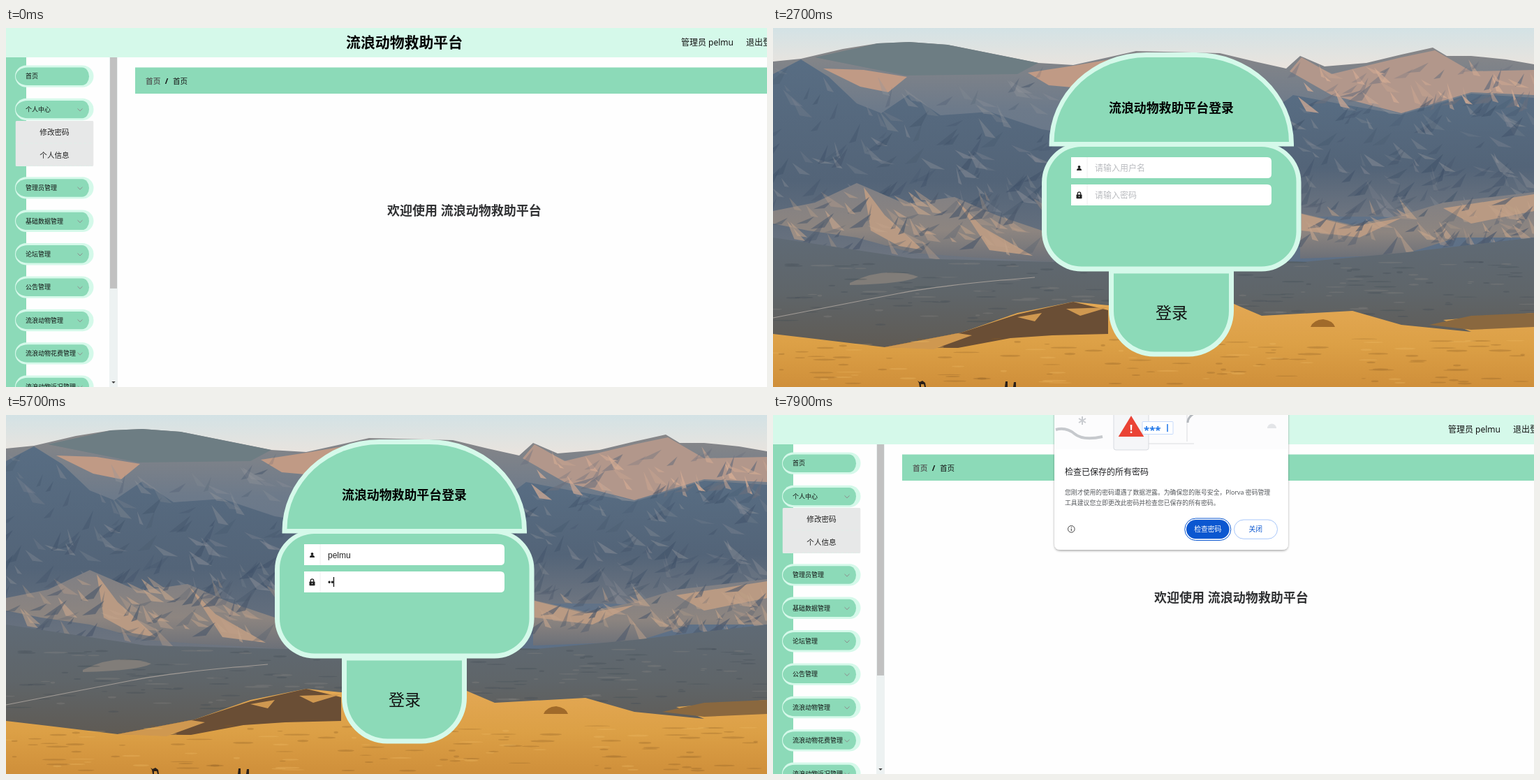
Write an HTML page that moves like this. It is 1090x514 px and loops after 8000 ms.

```html
<!DOCTYPE html>
<html lang="zh">
<head>
<meta charset="utf-8">
<style>
html, body { margin: 0; width: 100%; height: 100%; overflow: hidden; background: #fff }
svg { display: block }
#stage { position: absolute; left: 0; top: 0; font-family: "Noto Sans", "Noto Sans CJK SC", sans-serif }
.b { font-weight: 700 }
.m { text-anchor: middle }
.r { text-anchor: end }
.latin { font-family: "Liberation Sans", "Noto Sans CJK SC", sans-serif }
</style>
</head>
<body>
<svg id="stage" width="1090" height="514" viewBox="0 0 1090 514">
  <defs>
    <linearGradient id="sky" x2="0" y2="1"><stop stop-color="#d3e2e5"/><stop offset="1" stop-color="#efe4dc"/></linearGradient>
    <linearGradient id="far" x2="0" y2="1"><stop stop-color="#8a8888"/><stop offset=".3" stop-color="#6d7a8a"/><stop offset="1" stop-color="#5c6f86"/></linearGradient>
    <linearGradient id="near" x2="0" y2="1"><stop stop-color="#586d83"/><stop offset=".6" stop-color="#536478"/><stop offset="1" stop-color="#6e7580"/></linearGradient>
    <linearGradient id="foot" x2="0" y2="1"><stop stop-color="#7f7f84"/><stop offset=".6" stop-color="#8d8580"/><stop offset="1" stop-color="#6c7078"/></linearGradient>
    <linearGradient id="plain" x2="0" y2="1"><stop stop-color="#5f6a75"/><stop offset=".5" stop-color="#5f6569"/><stop offset="1" stop-color="#5f5a53"/></linearGradient>
    <linearGradient id="sand" x2="0" y2="1"><stop stop-color="#e3a854"/><stop offset=".5" stop-color="#dca046"/><stop offset="1" stop-color="#cf8f3a"/></linearGradient>
    <filter id="shade" x="-10%" y="-10%" width="120%" height="125%"><feDropShadow dx="0" dy="1.5" stdDeviation="1.6" flood-opacity=".35"/></filter>
  </defs>
  <g id="photo"></g>
  <g id="view"></g>
</svg>
<script>
const GREEN = '#8cdab8', MINT = '#d5f9ea', TEAL = '#00c292', LEAF = '#6ec455', GREY = '#606266', PALE = '#c0c4cc', LINE = '#dcdfe6';
const USER = 'pelmu', SITE = '流浪动物救助平台';
const MENU = ['首页', '个人中心', '管理员管理', '基础数据管理', '论坛管理', '公告管理', '流浪动物管理', '流浪动物花费管理', '流浪动物近况管理', '流浪动物领养管理'];

const clamp = u => Math.min(1, Math.max(0, u));
const smooth = u => (u = clamp(u), u * u * (3 - 2 * u));
const text = (x, y, size, str, fill = '#222', cls = '') =>
  `<text x="${x}" y="${y + size * .38}" font-size="${size}" style="fill:${fill}" class="${cls}">${str}</text>`;
const box = (x, y, w, h, fill, rx = 0, stroke = 'none') =>
  `<rect x="${x}" y="${y}" width="${w}" height="${h}" fill="${fill}" rx="${rx}" stroke="${stroke}"/>`;
const path = (d, fill, stroke = 'none', w = 1) =>
  `<path d="${d}" fill="${fill}" stroke="${stroke}" stroke-width="${w}"/>`;
const dot = (x, y, r, fill, stroke = 'none') =>
  `<circle cx="${x}" cy="${y}" r="${r}" fill="${fill}" stroke="${stroke}"/>`;
const at = (x, y, body) => `<g transform="translate(${x} ${y})">${body}</g>`;
const field = (x, y, w, h) => box(x, y, w, h, '#fff', 3, LINE);
const lens = (x, y, c) => at(x, y, dot(-.6, -.6, 4, 'none', c) + path('M2.3 2.3l2.8 2.8', 'none', c));

function photo() {
  let seed = 7;
  const rnd = () => (seed = seed * 16807 % 2147483647) / 2147483647;
  // Alternate lit and shaded rock faces
  const facets = (n, left, top, width, height, lit, dark, alpha = .3) => {
    let s = '';
    for (let i = 0; i < n; i++) {
      const x = left + rnd() * width, y = top + rnd() * height, w = 8 + rnd() * 28, h = 8 + rnd() * 22, side = i % 2 ? -1 : 1;
      s += `<path d="M${x} ${y}l${side * w} ${h}l${-side * w * .6} ${-h * .1}z" fill="${i % 2 ? dark : lit}" opacity="${alpha * (.5 + rnd())}"/>`;
    }
    return s;
  };
  const streaks = (n, top, height, fill) => {
    let s = '';
    for (let i = 0; i < n; i++)
      s += `<ellipse cx="${rnd() * 1090}" cy="${top + rnd() * height}" rx="${3 + rnd() * 16}" ry="${.6 + rnd()}" fill="${fill}" opacity=".3"/>`;
    return s;
  };
  return box(0, 0, 1090, 70, 'url(#sky)') +
    path('M0 48L40 44 100 30 150 22 195 20 250 24 300 34 380 50 430 53 480 42 520 33 640 36 690 48 735 58 755 40 790 55 850 50 900 38 945 28 965 40 1000 40 1050 45 1090 52V340H0z', 'url(#far)') +
    path('M60 42L150 22 195 20 250 24 380 50 350 66 190 68z', '#6d7d83') +
    path('M72 58L130 60 192 70 165 92 125 84zM365 64L430 54 500 42 440 86 395 82z', '#c09a85') +
    path('M740 62L757 42 800 66 900 42 948 32 1000 62 1090 60V96L1000 92 900 122 800 96z', '#b2978b') +
    path('M0 66L40 45 80 70 120 108 155 122 195 95 240 125 310 120 385 145 480 160V335H0z', 'url(#near)') +
    path('M700 130L745 96 820 110 900 124 1000 94 1090 100V270H700z', 'url(#near)') +
    facets(130, 0, 55, 420, 190, '#93959b', '#3a4c64') +
    facets(130, 700, 95, 390, 155, '#93959b', '#3a4c64') +
    facets(60, 750, 45, 340, 55, '#d8ae94', '#6a6f7c', .5) +
    path('M0 262L60 250 120 222 190 252 260 242 320 268 400 295V335L280 328 200 322 120 300 50 290 0 280z', 'url(#foot)') +
    path('M755 265L830 282 900 268 960 250 1090 235V300L980 300 900 325 755 330z', 'url(#foot)') +
    path('M130 228L160 268 215 318 180 312 140 290zM262 245L300 285 372 326 310 318zM757 266L830 284 900 272 840 300 757 290zM960 258L1090 238V262L1000 280z', '#b99a83') +
    facets(80, 20, 228, 380, 80, '#c4a48b', '#4b586b', .45) +
    facets(80, 755, 240, 335, 65, '#c4a48b', '#4b586b', .45) +
    path('M0 300L80 312 200 330 400 335 500 325 760 335 900 322 1090 300V460H0z', 'url(#plain)') +
    path('M110 365Q160 340 208 356 190 366 110 368z', '#817d79') +
    streaks(130, 335, 90, '#3e4a52') + streaks(70, 335, 80, '#8a8886') +
    path('M0 415Q120 392 180 380T375 357', 'none', '#a19b96', 1.2) +
    path('M0 438L60 445 160 457 270 436 350 408 430 392 480 397 620 395 660 395 700 412 830 405 900 425 1000 435 960 418 1090 408V514H0z', 'url(#sand)') +
    path('M160 457L270 436 350 410 430 392 480 404V438L400 440 340 444 265 458z', '#6a4e35') +
    path('M350 414L385 408 375 420zM420 402L480 400 440 412zM160 457L265 437 285 440 230 460z', '#cf9850') +
    path('M940 425L1000 412 1090 408V428L1000 432z', '#8a683f') +
    streaks(90, 445, 65, '#8b5d25') + streaks(40, 445, 65, '#f0bd68') +
    path('M770 428q4-10 18-11 14 2 17 11z', '#a06a2a') +
    path('M207 505l3 2 4-2 4 3 1 6h-2l-1-4h-4v4h-2l-1-6zM332 514l1-8h3v8zM344 514l1-7h3v7z', '#2a2019');
}

function sidebar(fold, hot1, hot2) {
  const subs = [0, 65 * (1 - fold), 32.5 * fold];
  const items = [[], [['修改密码', hot1], ['个人信息', 0]], [['管理员管理', hot2]]];
  let y = 69, s = box(0, 42, 29, 472, GREEN);
  MENU.forEach((name, i) => {
    s += at(0, y, box(13, -15.6, 112.5, 31.4, MINT, 16) +
      path('M31-12.5H109a10 12.7 0 0 1 0 25.4H31a17 12.7 0 0 1 0-25.4', GREEN) +
      text(28, 0, 9, name, '#111') +
      (i ? path('M102.5-1l3.5 3.4 3.5-3.4', 'none', '#8d8487', .9) : ''));
    if (subs[i] > .1) {
      const rows = items[i].map(([label, hot], j) =>
        text(56, 16.4 + j * 32.5, 10.6, label, `color-mix(in srgb,${MINT} ${hot * 100}%,#222)`, 'm') +
        `<path d="M0 ${32 + j * 32.5}H112" stroke="${MINT}" stroke-dasharray="4 3" opacity="${.4 + hot * .6}"/>`).join('');
      s += `<svg x="13.5" y="${y + 16.6}" width="112" height="${subs[i]}">${box(0, 0, 112, subs[i], '#e7e8e8', 2)}${rows}</svg>`;
    }
    y += 47.4 + (subs[i] || 0);
  });
  const thumb = 462 * 472 / (594 + subs[1] + subs[2]);
  return s + box(148, 42, 12, 472, '#edf2f2') + box(149, 42, 10, thumb, '#c1c1c1') + path('M151.3 506h5.4l-2.7 3z', '#444');
}

const home = () => text(546, 261, 18, '欢迎使用 ' + SITE, '#303133', 'b');

const passwordForm = () => ['原密码', '新密码', '确认密码'].map((label, i) => {
  const y = 131.8 + i * 43.7;
  return text(253, y, 10.6, `<tspan style="fill:#f56c6c">*</tspan> ${label}`, GREY, 'r') + field(261.5, y - 13.2, 446.5, 26.5);
}).join('') + box(261.5, 250, 54, 26.3, TEAL, 2.5) + text(288.7, 263, 11, '确 定', '#fff', 'm');

function table() {
  const button = (x, y, fill, label, tx) => box(x, y, 66.3, 26.7, fill, 2.5) + text(tx, y + 13, 10.8, label, '#fff');
  const head = [[256, '索引'], [368.5, '用户名', 393], [573, '密码', 592], [778, '角色', 797], [1001, '操作']];
  const pager = (x, d) => box(x, 301.5, 23, 20.5, '#f4f4f5', 2) + path(d, 'none', PALE);
  return text(200, 131, 10.6, '用户名', '#444') + field(240.5, 116.5, 175.5, 29) + lens(254, 130, PALE) +
    text(263, 131, 10.6, '用户名', PALE) +
    button(423.3, 117, LEAF, '查询', 453) + lens(444.5, 129.8, '#fff') +
    button(200, 163, LEAF, '新增', 229.5) + path('M216.5 176h9M221 171.5v9', 'none', '#fff') +
    button(266.3, 163, '#e6bcb5', '删除', 295.5) + path('M282.5 173h9M285.5 173v-1.6h3v1.6M283.5 173v7.5h7V173M286 175v3.5M288.2 175v3.5', 'none', '#fff') +
    box(200.5, 207, 890, 40.3, GREEN) +
    path('M237.5 207v40M275 207v40M479.5 207v40M684.5 207v40M889 207v40', 'none', '#e2f5ed') +
    box(214, 222, 10.5, 10.5, '#fff', 1.5) +
    head.map(([x, label, sort]) => text(x, 227, 10.6, label, '#111', 'b m') +
      (sort ? path(`M${sort - 3} 225.5h6l-3-3.5zM${sort - 3} 228h6l-3 3.5z`, '#b6c6c4') : '')).join('') +
    text(657, 270.5, 10.6, '暂无数据', '#909399', 'm') + path('M200.5 247v44.5H1090', 'none', LINE) +
    text(504, 312, 9.8, '共 0 条', GREY) + field(546.5, 302, 74, 20.5) + text(577, 312, 9.8, '10条/页', GREY, 'm') +
    path('M608 310.8l3 3 3-3', 'none', PALE) +
    pager(635, 'M648 308.5l-3 3.3 3 3.3') + pager(695, 'M705 308.5l3 3.3-3 3.3') +
    box(665, 301.5, 23, 20.5, TEAL, 2) + text(676.5, 312, 10, '1', '#fff', 'b m') +
    text(739, 312, 9.8, '前往', GREY) + field(762, 302, 34, 20.5) + text(779, 312, 9.8, '1', GREY, 'm') + text(798.5, 312, 9.8, '页', GREY);
}

function dialog(opacity) {
  return `<g opacity="${opacity}">` +
    '<path d="M403-5H738V184q0 9-9 9H412q-9 0-9-9z" fill="#fff" filter="url(#shade)"/>' +
    box(403, 0, 335, 49, '#fcfcfd') +
    path('M405 21Q420 17 432 27T472 31', 'none', '#c6c9cd', 4) +
    path('M443 2v12M438 5l10 6M438 11l10-6', 'none', '#c9ccd0', 2) +
    box(488, -5, 50, 55, '#f5f6f8', 3, '#d7dae0') + path('M538 41H603M593-1V38', 'none', '#dadce0') +
    path('M603-2Q594 3 594 11', 'none', '#b3b7bc', 3) + path('M708 19a6 6 0 0 1 13 0z', '#e3e5e8') +
    box(529, 9.5, 44, 18, '#fff', 1, '#c6dafc') + text(531, 21, 15, '***', '#1a73e8', 'b') + path('M565 13v11', 'none', '#1a73e8', 1.5) +
    path('M513 3l16.5 27h-33z', '#ea4335', '#ea4335', 2) + text(513, 19.5, 16, '!', '#fff', 'b m') +
    text(418, 81.5, 12, '检查已保存的所有密码', '#202124') +
    text(418, 110.5, 8.87, '您刚才使用的密码遭遇了数据泄露。为确保您的账号安全，Plorva 密码管理', '#55585c') +
    text(418, 125.5, 8.87, '工具建议您立即更改此密码并检查您已保存的所有密码。', '#55585c') +
    dot(427.3, 163.3, 4.8, 'none', '#444') + path('M427.3 162.5v3.5M427.3 160v1.3', 'none', '#444', 1.1) +
    box(589.8, 148, 66, 31.5, '#fff', 15.7, '#0b57d0') + box(592, 150, 61.6, 27.3, '#0b57d0', 13.6) +
    text(622.8, 163.7, 9.8, '检查密码', '#fff', 'm') +
    box(660.5, 150, 62, 27.3, '#fff', 13.6, '#a8c7fa') + text(691.3, 163.7, 9.8, '关闭', '#0b57d0', 'm') + '</g>';
}

function dashboard(t) {
  const page = t < 1200 || t >= 7000 ? ['首页', home] : t < 2300 ? ['修改密码', passwordForm] : ['管理信息', table];
  const early = t < 7000;
  return box(0, 0, 1090, 514, '#fefefe') + box(0, 0, 1090, 42, MINT) +
    (t === 100 ? box(1052, 0, 38, 42, '#c6f1e0') : '') +
    text(487, 20.5, 20.9, SITE, '#000', 'b') + text(967, 20, 12, '管理员 ' + USER, '#111') + text(1060, 20, 12, '退出登录', '#111') +
    sidebar(early ? smooth((t - 1757) / 300) : 0, early ? clamp((t - 900) / 300) : 0, clamp((t - 2000) / 300)) +
    box(185, 56.5, 905, 37.5, GREEN) + text(200, 75.5, 10.7, '首页', '#58655f', 'b') + text(230, 75.5, 11, '/', '#111', 'b m') +
    text(239, 75.5, 10.6, page[0], '#111') + page[1]() +
    (t >= 7800 ? dialog((t - 7700) / 200) : '');
}

const pen = document.createElement('canvas').getContext('2d');
function entry(y, value, hint, caret) {
  pen.font = '12px "Liberation Sans", sans-serif';
  return path(`M427 ${y - 15}H708q6 0 6 6v18q0 6-6 6H427z`, '#fff') + path(`M450 ${y - 15}v30`, 'none', '#eee') +
    text(461, y, 12, value || hint, value ? '#222' : '#b9bbbf', value ? 'latin' : '') +
    (caret ? box(460.4 + pen.measureText(value).width, y - 7, 1.3, 14, '#111') : '');
}

// Saved-login popup; y is the tip of its arrow
const popup = y => at(0, y, '<path d="M528.5 6H533l6.5-6 6.5 6H635.5q5 0 5 5v68.5q0 5-5 5H528.5q-5 0-5-5V11q0-5 5-5z" fill="#fff" filter="url(#shade)"/>' +
  path('M523.5 50.5H640.5V79.5q0 5-5 5H528.5q-5 0-5-5z', '#f8fafc') + path('M523.5 50.5h117', 'none', '#d3e1f3') +
  box(533.5, 23.5, 9.5, 9.5, '#41b883') + text(553, 20, 9.7, 'sondapelmu', '#333') + text(554, 36, 12, '••••••', '#444', 'latin') +
  dot(540, 67.5, 5.3, '#45484c') + text(556, 67.5, 9.7, '管理密码...', '#444') + dot(622, 67.5, 4.3, '#4285f4'));

function login(t) {
  const typed = t < 3900 ? 0 : t < 4100 ? 1 : Math.min(5, (t - 4100) / 100 + 2);
  const dots = t < 5600 ? 0 : t < 5900 ? (t - 5500) / 100 : t < 6000 ? 5 : 6;
  const nameCaret = t >= 3600 && t < 4700;
  const passCaret = t >= 4700 && t < 5200 || t >= 5600 && t < 6400;
  return box(385, 164, 371.5, 184.5, MINT, 57) + box(392, 170, 357.5, 171.5, GREEN, 50) +
    path('M395.5 169.5V166A140 131 0 0 1 535 35H606A140 131 0 0 1 746 166V169.5z', MINT) +
    path('M402.5 163A133 121 0 0 1 535 42H606A133 121 0 0 1 739 163z', GREEN) +
    path('M481 345H660V405A65 65.5 0 0 1 595 470.5H546A65 65.5 0 0 1 481 405z', MINT) +
    path('M488 351.5H653V405A58 58.5 0 0 1 595 463.5H546A58 58.5 0 0 1 488 405z', GREEN) +
    text(481, 114.5, 17.9, SITE + '登录', '#000', 'b') + text(571, 407, 23, '登录', '#111', 'm') +
    entry(200, USER.slice(0, typed), '请输入用户名', nameCaret) + entry(239, '•'.repeat(dots), '请输入密码', passCaret) +
    dot(438.5, 199, 1.9, '#222') + path('M435 204q0-3.3 3.5-3.3t3.5 3.3z', '#222') +
    box(434.5, 238.5, 8, 5.8, '#222', .8) + path('M436.3 239v-2a2.2 2.2 0 0 1 4.4 0v2', 'none', '#222', 1.3) + dot(438.5, 241.3, .8, '#fff') +
    (t >= 3700 && t < 4000 ? popup(215.5) : t >= 4700 && t < 5600 ? popup(254) : '');
}

const view = document.getElementById('view');
document.getElementById('photo').innerHTML = photo();
let shown = -1;
function tick() {
  const t = Math.floor(performance.now() % 8000 / 100) * 100;
  if (t !== shown) {
    shown = t;
    view.innerHTML = t >= 2700 && t < 7000 ? login(t) : dashboard(t);
  }
  requestAnimationFrame(tick);
}
tick();
</script>
</body>
</html>
```
